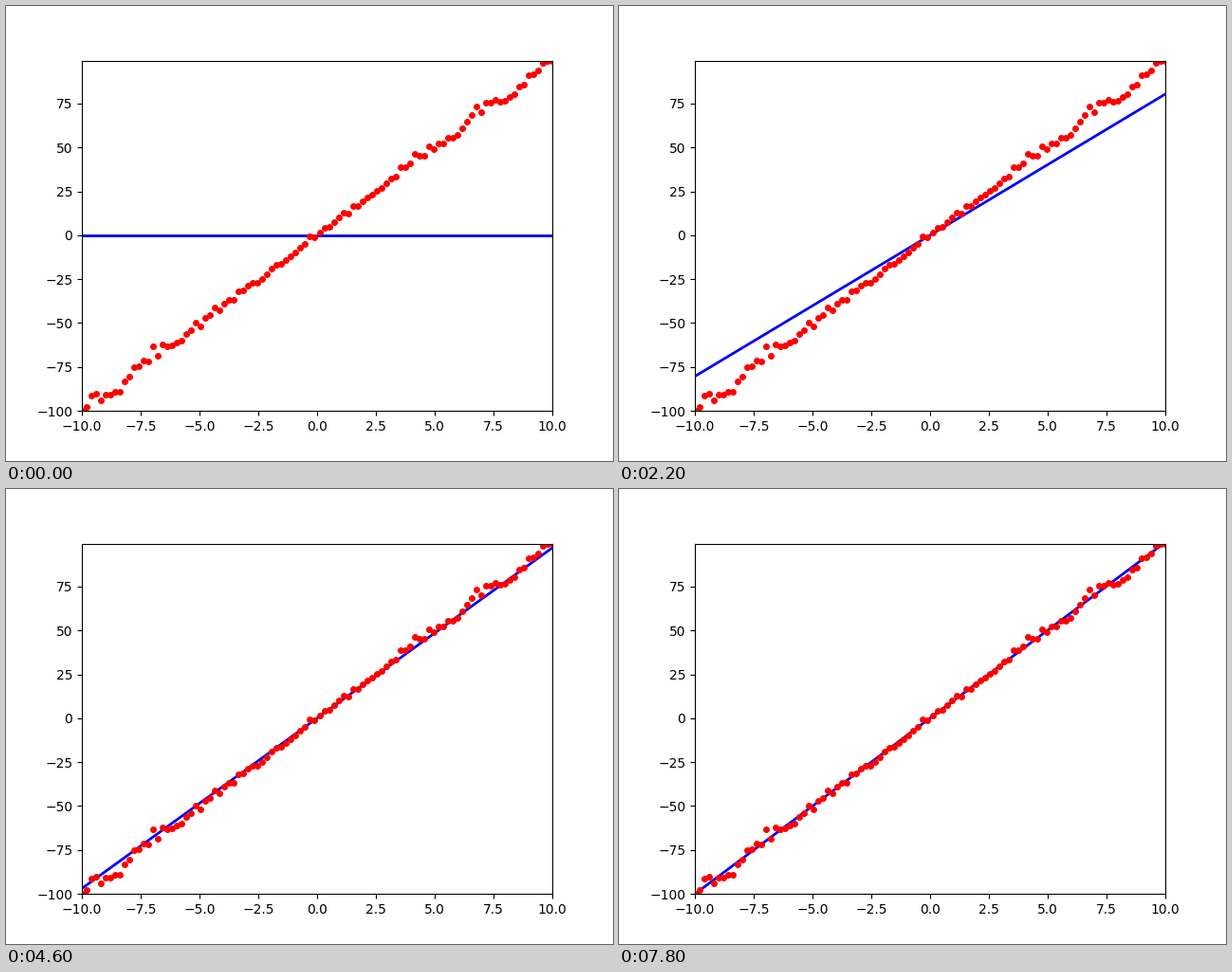
Write a matplotlib script that moves like this. It is 640 px wide and 480 px high and loops after 8000 ms.

```python
import numpy as np
import matplotlib.pyplot as plt
from matplotlib.animation import FuncAnimation

COUNT = 100
STEPS = 40
RATE = 0.004
BEST_SLOPE, BEST_OFFSET = 10.053, 0.45
Y_MIN, Y_MAX = -100.1, 99.5


def make_samples():
    """Points along y = 10x with a slow drift and scatter that grows outward."""
    rng = np.random.default_rng(4)
    x = np.linspace(-10, 10, COUNT)
    knots = [0, 3, 7, 15, 21, 28, 36, 54, 62, 69, 75, 86, 90, 99]
    drift = [0, 2.2, -3.5, 3, -1.5, 1.5, -1, 1, -1, 3, -0.5, 2.7, -1.5, 0.3]
    noise = rng.normal(0, 0.9 + 0.1 * np.abs(x))
    y = 10 * x + np.interp(np.arange(COUNT), knots, drift) + noise
    return x, np.clip(y, Y_MIN, Y_MAX)


def fit(step):
    """Slope and offset after some steps of gradient descent from zero."""
    slope = BEST_SLOPE * (1 - (1 - RATE * np.mean(x ** 2)) ** step)
    offset = BEST_OFFSET * (1 - (1 - RATE) ** step)
    return slope, offset


x, y = make_samples()

fig, ax = plt.subplots(figsize=(6.4, 4.8), dpi=100)
ax.set_xlim(-10, 10)
ax.set_ylim(Y_MIN, Y_MAX)
line, = ax.plot(x, np.zeros_like(x), color="blue", lw=2)
ax.plot(x, y, "ro", ms=4)


def update(step):
    slope, offset = fit(step)
    line.set_ydata(slope * x + offset)
    return line,


anim = FuncAnimation(fig, update, frames=STEPS, init_func=lambda: update(0),
                     interval=200, repeat=True, repeat_delay=0)
plt.show()
```
